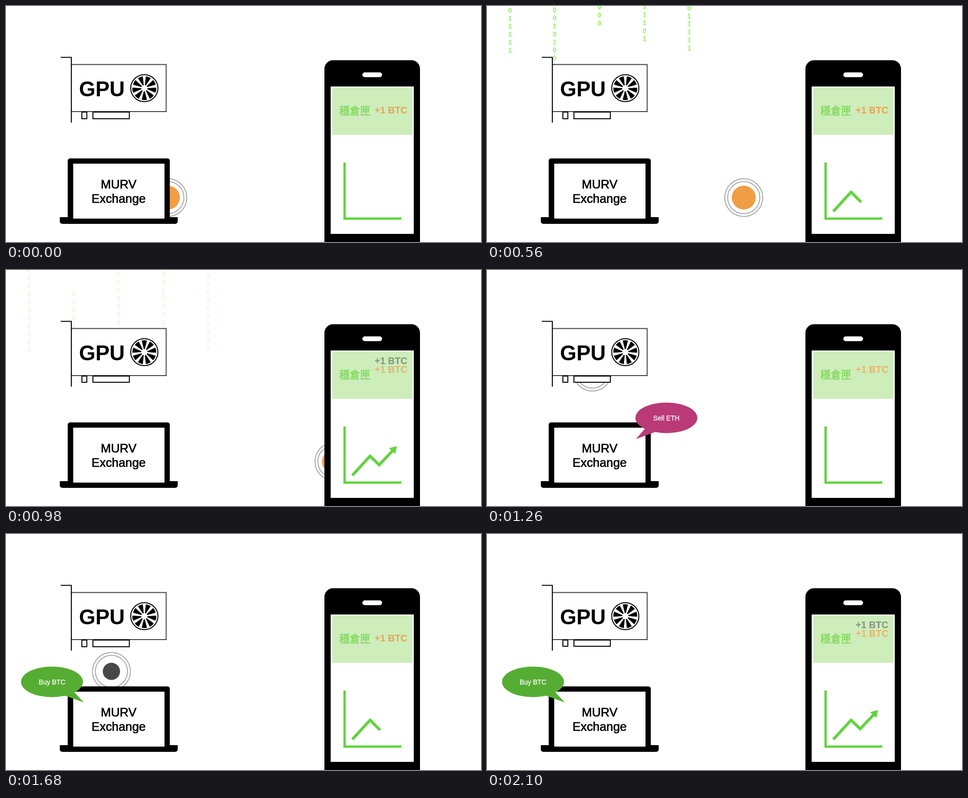
These frames come from a looping animation (989 px wide and 494 px high, 2240 ms). An HTML page:

```html
<!DOCTYPE html>
<html lang="zh-Hant">
<head>
<meta charset="utf-8">
<title>Mining to savings</title>
<style>
  html, body { margin: 0; width: 100%; height: 100%; overflow: hidden; background: #fff; }
  svg { display: block; width: 989px; height: 494px; font-family: "Liberation Sans", Arial, sans-serif; }
  .digits { fill: #90f264; font-size: 14px; font-weight: bold; text-anchor: middle; }
  .coin { fill: #fff; stroke: #aaa; stroke-width: 2; }
  .board { fill: #fff; stroke: #000; stroke-width: 2; }
  .chart { fill: none; stroke: #62d33e; }
  .gain { font-size: 19.6px; font-weight: bold; }
  .label { font-size: 25.4px; text-anchor: middle; stroke: #000; stroke-width: .7; }
  .bubble text { font-size: 13.9px; fill: #fff; text-anchor: middle; stroke: #fff; stroke-width: .3; }
</style>
</head>
<body>
<svg viewBox="0 0 989 494">
  <g id="digits" class="digits"></g>

  <g id="btcCoin" class="coin">
    <circle r="39.5"/><circle r="33.5"/><circle r="25" fill="#f09e45" stroke="none"/>
  </g>
  <g id="ethCoin" class="coin">
    <circle r="39.5"/><circle r="33.5"/><circle r="18" fill="#484848" stroke="none"/>
  </g>

  <g class="board">
    <rect x="136" y="122.5" width="197.5" height="98.5" stroke="#444"/>
    <path d="M114 107.5H136V244" fill="none"/>
    <path id="pins"/>
    <text x="152" y="188.5" font-size="44" font-weight="bold" fill="#000" stroke="none">GPU</text>
    <circle cx="288" cy="172" r="28.3"/>
    <g id="fan"></g>
  </g>

  <g>
    <rect x="128.5" y="319" width="212.5" height="130" rx="5"/>
    <path d="M112 442H357.5V450Q357.5 456 351.5 456H118Q112 456 112 450Z"/>
    <rect x="140" y="330" width="190" height="115" fill="#fff"/>
    <text class="label" x="234.5" y="381.5">MURV</text>
    <text class="label" x="234.5" y="411.5">Exchange</text>
  </g>

  <g>
    <rect x="663" y="113.5" width="199" height="420" rx="18"/>
    <rect x="742" y="139" width="41" height="10" rx="5" fill="#fff"/>
    <rect x="676" y="168.5" width="173" height="308.5" fill="#fff"/>
    <rect x="679.5" y="170.5" width="167" height="99" fill="#cdedbb"/>
    <text x="694" y="227" font-size="21.6" fill="#80d958" stroke="#80d958" stroke-width=".5"
      style="font-family: 'Noto Sans CJK TC', 'Noto Sans CJK', sans-serif">穩倉匣</text>
    <text id="grayGain" class="gain" x="767.5" fill="#6d7369">+1 BTC</text>
    <text id="orangeGain" class="gain" x="767.5" fill="#eda04f">+1 BTC</text>
    <path class="chart" stroke-width="5" d="M705 327.5V445H823"/>
    <path id="trend" class="chart" stroke-width="6"/>
    <path id="arrow" fill="#62d33e" d="M814 368.5L810.5 385L797.5 373Z"/>
  </g>

  <g id="sell" class="bubble" fill="#b93a76">
    <ellipse cx="373.5" cy="309.5" rx="64.5" ry="32"/>
    <path d="M330 331L310 354L353 338Z"/>
    <text x="373.5" y="314.5">Sell ETH</text>
  </g>
  <g id="buy" class="bubble" fill="#55ad33">
    <ellipse cx="95.8" cy="309.5" rx="64.5" ry="32"/>
    <path d="M119 337L162 352.5L141 330Z"/>
    <text x="95.8" y="314.5">Buy BTC</text>
  </g>
</svg>
<script>
const STEP_MS = 140, STEPS = 16, BLADES = 9;
const $ = id => document.getElementById(id);

function add(parent, tag, attrs, text = "") {
  const node = document.createElementNS("http://www.w3.org/2000/svg", tag);
  for (const key in attrs) node.setAttribute(key, attrs[key]);
  node.textContent = text;
  parent.append(node);
}
const set = (id, name, value) => $(id).setAttribute(name, value);
const show = (id, visible) => set(id, "visibility", visible ? "visible" : "hidden");
const place = (id, x, y) => set(id, "transform", `translate(${x} ${y})`);

// x, height of the lowest digit at the start, digits from top to bottom
const columns = [
  [48, -6, "01101011111"],
  [141, 44, "01001010000"],
  [234, -63, "1110000"],
  [328, -30.5, "001011101"],
  [421, -11, "01101011111"]
];
for (const [x, bottom, digits] of columns)
  [...digits].forEach((digit, i) =>
    add($("digits"), "text", { x, y: bottom + 5 - 16.8 * (digits.length - 1 - i) }, digit));

add($("fan"), "circle", { r: 25, fill: "#000", stroke: "none" });
for (let i = 0; i < BLADES; i++)
  add($("fan"), "path", { d: "M0 0L-2.8 -26H2.8Z", transform: `rotate(${i * 360 / BLADES})`, stroke: "#fff", "stroke-width": 1 });
add($("fan"), "circle", { r: 6.5, stroke: "none" });

const trends = [
  "",
  "M721 430L761 387",
  "M721 430L758 389.5L779 410.5",
  "M721 430L758 389.5L777 408L808 375"
];
const orangeBaselines = [225, 215, 223, 215];

function draw(step) {
  const odd = step % 2, phase = step % 4, stage = Math.floor(step % 8 / 2);
  const firstHalf = step < STEPS / 2;

  show("digits", step > 0 && firstHalf);
  place("digits", 0, step * 24.7);
  set("digits", "opacity", Math.max(0, Math.min(1, (8 - step) / 4)));

  place("btcCoin", 337 + step * 49.4, 401);
  show("btcCoin", firstHalf);
  place("ethCoin", 219.5, 263 + (step - 11) * 24.6);
  show("ethCoin", !firstHalf);

  const pinHeight = odd ? 13 : 14;
  set("pins", "d", `M158 222h10.3v${pinHeight}h-10.3ZM181 222h75.8v${pinHeight}h-75.8Z`);
  set("fan", "transform", `translate(288 172) rotate(${odd * 180 / BLADES})`);

  set("orangeGain", "y", orangeBaselines[phase]);
  set("grayGain", "y", odd ? 196.5 : 206);
  show("grayGain", phase > 1);
  for (const id of ["orangeGain", "grayGain"]) set(id, "opacity", odd ? .75 : 1);

  set("trend", "d", trends[stage]);
  show("arrow", stage === 3);
  show("sell", step >= 8 && step < 12);
  show("buy", step >= 12);
}

function tick() {
  draw(Math.floor(performance.now() / STEP_MS) % STEPS);
  requestAnimationFrame(tick);
}
tick();
</script>
</body>
</html>
```
